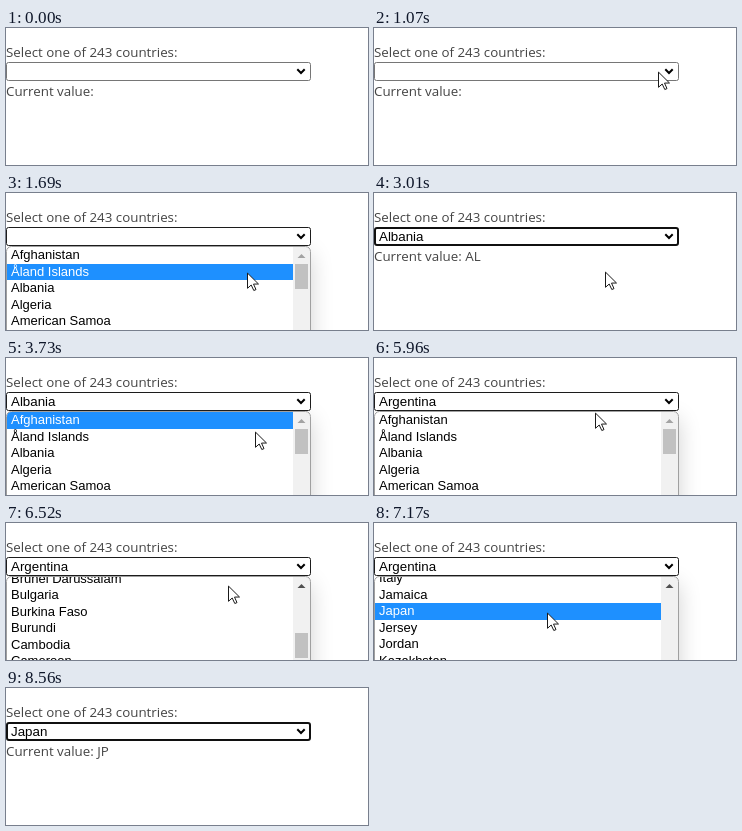
An HTML page with a canvas for the animation above (9.44 s loop, 362x137 px).

```html
<!DOCTYPE html>
<html lang="en">
<head>
<meta charset="utf-8">
<title>Country select</title>
<style>
html, body { margin: 0; width: 100%; height: 100%; overflow: hidden; background: #fff; }
canvas { display: block; width: 362px; height: 137px; }
</style>
</head>
<body>
<canvas id="stage"></canvas>
<script>
const W = 362, H = 137;
const LOOP = 9440, STEPS = 121, LEAD = 35;   // the screen updates in even steps
const ROW = 16.5, TOP = 54;
const LABEL = '13.35px "Open Sans", "Noto Sans", sans-serif';
const VALUE = '13.333px "Liberation Sans", Arial, sans-serif';
const OPTION = '13px "Liberation Sans", Arial, sans-serif';

const countries = ('Afghanistan|Åland Islands|Albania|Algeria|American Samoa|Andorra|Angola|Anguilla|Antarctica|' +
  'Antigua and Barbuda|Argentina|Armenia|Aruba|Australia|Austria|Azerbaijan|Bahamas|Bahrain|Bangladesh|Barbados|' +
  'Belarus|Belgium|Belize|Benin|Bermuda|Bhutan|Bolivia|Bosnia and Herzegovina|Botswana|Bouvet Island|Brazil|' +
  'British Indian Ocean Territory|Brunei Darussalam|Bulgaria|Burkina Faso|Burundi|Cambodia|Cameroon|Canada|' +
  'Cape Verde|Cayman Islands|Central African Republic|Chad|Chile|China|Christmas Island|Cocos (Keeling) Islands|' +
  'Colombia|Comoros|Congo|Congo, The Democratic Republic of the|Cook Islands|Costa Rica|Cote D\'Ivoire|Croatia|' +
  'Cuba|Cyprus|Czech Republic|Denmark|Djibouti|Dominica|Dominican Republic|Ecuador|Egypt|El Salvador|' +
  'Equatorial Guinea|Eritrea|Estonia|Ethiopia|Falkland Islands (Malvinas)|Faroe Islands|Fiji|Finland|France|' +
  'French Guiana|French Polynesia|French Southern Territories|Gabon|Gambia|Georgia|Germany|Ghana|Gibraltar|' +
  'Greece|Greenland|Grenada|Guadeloupe|Guam|Guatemala|Guernsey|Guinea|Guinea-Bissau|Guyana|Haiti|' +
  'Heard Island and Mcdonald Islands|Holy See (Vatican City State)|Honduras|Hong Kong|Hungary|Iceland|India|' +
  'Indonesia|Iran, Islamic Republic Of|Iraq|Ireland|Isle of Man|Israel|Italy|Jamaica|Japan|Jersey|Jordan|' +
  'Kazakhstan|Kenya|Kiribati').split('|');

// Each use of the list, in steps
const picks = [
  { open: 16, close: 32, name: 'Albania', code: 'AL' },
  { open: 44, close: 64, name: 'Argentina', code: 'AR' },
  { open: 75, close: 97, name: 'Japan', code: 'JP' }
];
const ENTER = 8;
const moves = [
  { from: 7, to: 14, x: 284, y: 43 },
  { from: 19, to: 26, x: 220, y: 97 },
  { from: 27, to: 28, x: 221, y: 99 },
  { from: 38, to: 43, x: 250, y: 40 },
  { from: 46, to: 52, x: 247, y: 139, ease: 1 },
  { from: 67, to: 73, x: 220, y: 43 },
  { from: 75, to: 78, x: 222, y: 62 },
  { from: 88, to: 91, x: 172, y: 88 },
  { from: 91, to: 92, x: 173, y: 89 },
  { from: 109, to: 110, x: 172, y: 200 }
];
const wheel = { from: 79, to: 88, distance: 1772.5, ease: 2.04 };

const canvas = document.getElementById('stage');
const ctx = canvas.getContext('2d');
const dpr = window.devicePixelRatio || 1;
canvas.width = W * dpr;
canvas.height = H * dpr;

const progress = (step, { from, to }) => Math.min(1, Math.max(0, (step - from) / (to - from)));

function pointerAt(step) {
  let x = 268, y = 130;
  for (const m of moves) {
    const k = 1 - (1 - progress(step, m)) ** (m.ease || 2);
    x += (m.x - x) * k;
    y += (m.y - y) * k;
  }
  return { x, y };
}

const scrollAt = step => wheel.distance * progress(step, wheel) ** wheel.ease;

// Hovering trails the pointer and ignores wheel scrolling
function hoverAt(step, selected) {
  const { x, y } = pointerAt(step - 0.5);
  if (y < TOP || x > 287) return countries.indexOf(selected);
  const offset = step > wheel.to ? wheel.distance : 0;
  return Math.floor((y - TOP + offset) / ROW);
}

function text(str, x, y, font, color) {
  ctx.font = font;
  ctx.fillStyle = color;
  ctx.fillText(str, x, y);
}

function rect(x, y, w, h, color) {
  ctx.fillStyle = color;
  ctx.fillRect(x, y, w, h);
}

function box(x, y, w, h, r) {
  ctx.beginPath();
  ctx.roundRect(x, y, w, h, r);
}

function stroke(color, width) {
  ctx.strokeStyle = color;
  ctx.lineWidth = width;
  ctx.stroke();
}

function poly(points, fill) {
  ctx.beginPath();
  points.forEach(([x, y]) => ctx.lineTo(x, y));
  ctx.closePath();
  ctx.fillStyle = fill;
  ctx.fill();
}

function drawSelect(value, open, focused) {
  const ring = focused && !open;
  if (ring) box(1, 35, 303, 17, 2);
  else box(0.5, 34.5, 304, 18, 2);
  ctx.fillStyle = '#fff';
  ctx.fill();
  stroke(ring ? '#101010' : open ? '#1c1c1c' : '#767676', ring ? 2 : 1);
  text(value, 5, 48, VALUE, '#000');
  ctx.beginPath();
  ctx.moveTo(291.3, 41.3);
  ctx.lineTo(295, 45);
  ctx.lineTo(298.7, 41.3);
  stroke('#000', 2);
}

function drawRow(i, offset, active) {
  const y = Math.round(TOP + i * ROW - offset);
  if (active) rect(1, y, 286, Math.round(TOP + (i + 1) * ROW - offset) - y, '#1e90ff');
  text(countries[i] || '', 5, y + 12, OPTION, active ? '#fff' : '#000');
}

function drawList(offset, hover) {
  ctx.save();
  ctx.shadowColor = 'rgba(0,0,0,.18)';
  ctx.shadowBlur = 22 * dpr;
  ctx.shadowOffsetY = 8 * dpr;
  box(0, 53, 305, 331, 5);
  ctx.fillStyle = '#fff';
  ctx.fill();
  ctx.restore();

  ctx.save();
  box(1, TOP, 303, 329, 4);
  ctx.clip();
  const first = Math.floor(offset / ROW);
  for (let i = first; i < first + 7; i++) drawRow(i, offset, i === hover);
  rect(287, TOP, 17, 330, '#f1f1f1');
  poly([[291.5, 65], [295.5, 61], [299.5, 65]], offset ? '#505050' : '#a3a3a3');
  rect(289, Math.round(71 + offset * 0.0733), 13, 25, '#c1c1c1');
  ctx.restore();

  box(0.5, 53.5, 304, 330, 5);
  stroke('#a0a0a0', 1);
}

function drawPointer({ x, y }) {
  ctx.save();
  ctx.translate(Math.round(x) + 0.5, Math.round(y) + 0.5);
  poly([[0, 0.6], [0, 15.8], [3.7, 12.5], [6.3, 18], [8.5, 17.1], [6, 11.6], [11, 11.5]], '#fff');
  stroke('#1a1a1a', 1);
  ctx.restore();
}

function draw(ms) {
  const step = Math.floor((ms % LOOP + LEAD) * STEPS / LOOP);
  const picked = picks.filter(p => step >= p.close).pop() || { name: '', code: '' };
  const open = picks.some(p => step >= p.open && step < p.close);
  const pointer = pointerAt(step);

  ctx.setTransform(dpr, 0, 0, dpr, 0, 0);
  rect(0, 0, W, H, '#fff');
  text('Current value: ' + picked.code, 0, 68, LABEL, '#444');
  if (open) drawList(scrollAt(step), hoverAt(step, picked.name));
  text('Select one of 243 countries:', 0, 29, LABEL, '#444');
  drawSelect(picked.name, open, step >= picks[0].open);
  if (step >= ENTER && pointer.y < H) drawPointer(pointer);
}

let start;
function frame(now) {
  start ??= now;
  draw(now - start);
  requestAnimationFrame(frame);
}
draw(0);
requestAnimationFrame(frame);
</script>
</body>
</html>
```
